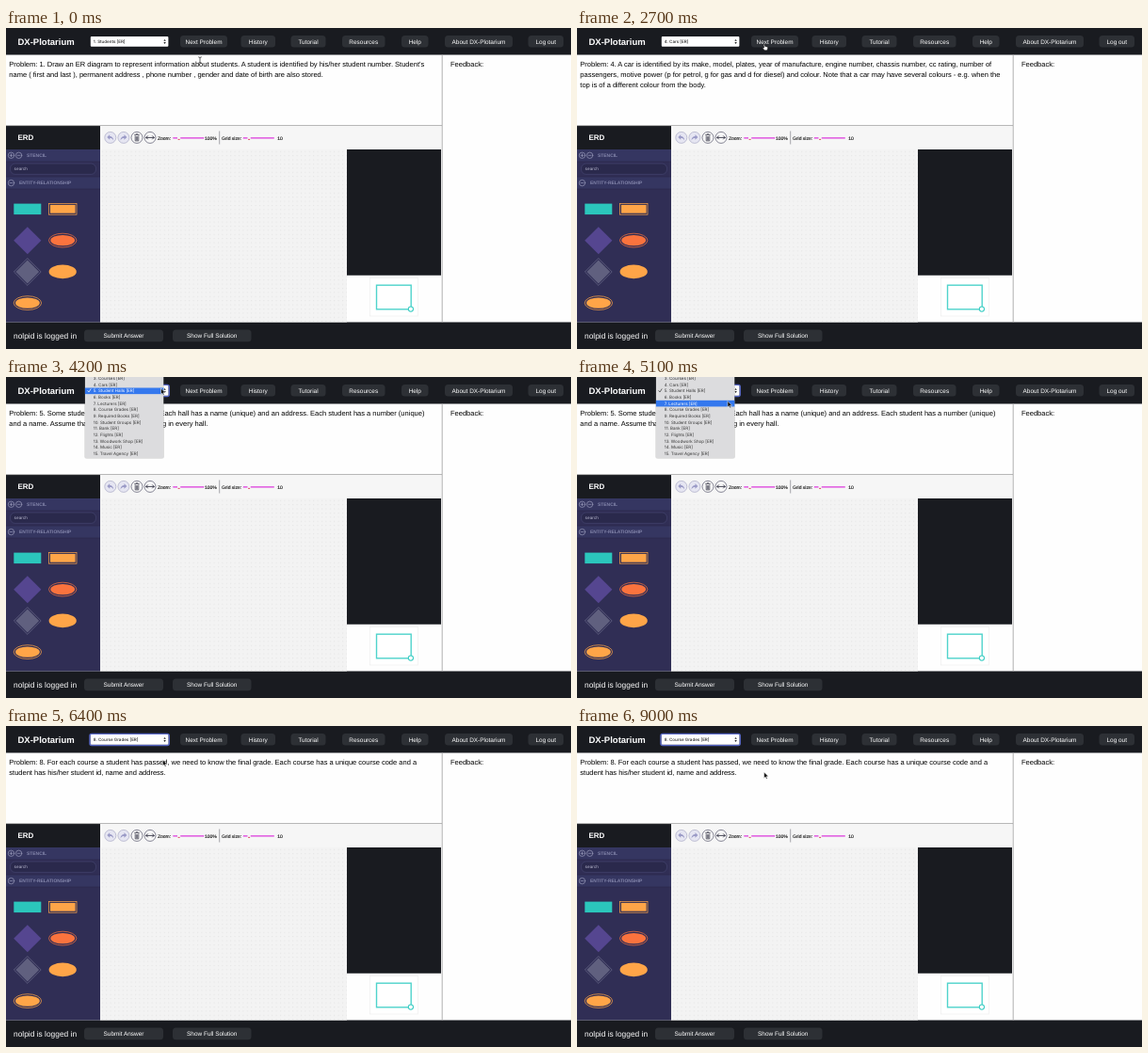
An HTML page for the animation above (9100 ms loop, 600 px wide and 341 px high).

```html
<!DOCTYPE html>
<html lang="en">
<head>
<meta charset="utf-8">
<title>ER diagram exercises</title>
<style>
  html, body { margin: 0; height: 100%; overflow: hidden; background: #fff; }
  svg { display: block; width: 100vw; height: 100vh; }
  text { font: 7.5px "Liberation Sans", Arial, sans-serif; text-rendering: geometricPrecision; white-space: pre; }
  .button rect { fill: #2d3035; }
  .button text { font-size: 6.45px; fill: #fff; text-anchor: middle; }
  .brand { font-size: 9.5px; font-weight: bold; fill: #fff; }
  .erd { font-size: 8px; font-weight: bold; fill: #fff; }
  .group { font-size: 4.95px; font-weight: bold; fill: #8587ac; }
  .tool { font-size: 5px; fill: #111; stroke: #111; stroke-width: .12; }
  .menu { font: 4.5px Inter, sans-serif; fill: #333; }
  .chosen { font-weight: 500; fill: #222; }
  .line { fill: none; stroke-linecap: round; stroke-linejoin: round; }
</style>
</head>
<body>
<svg viewBox="0 0 600 341" preserveAspectRatio="none">
  <defs>
    <pattern id="dots" x="100" y="129" width="4.4" height="4.4" patternUnits="userSpaceOnUse">
      <rect x="2" y="2" width=".8" height=".8" fill="#d8d8d8"/>
    </pattern>
  </defs>

  <!-- page panels -->
  <rect width="600" height="341" fill="#fefefe"/>
  <path d="M0 0H600V28.5H0zM0 312.5H600V341H0zM0 104H100V129H0zM362 129H462V262.5H362z" fill="#191b20"/>
  <path d="M0 103.6H463M463.2 28.5V312.5" stroke="#a6a6a8" stroke-width=".9"/>
  <rect x="100" y="104.2" width="362" height="25" fill="#f6f6f6"/>
  <rect x="100" y="129" width="262" height="183.5" fill="#f3f3f3"/>
  <rect x="100" y="129" width="262" height="183.5" fill="url(#dots)"/>
  <rect x="362" y="129" width="100" height="133.5" fill="#191b20"/>
  <text class="brand" x="12.5" y="17.8">DX-Plotarium</text>
  <text class="erd" x="12.5" y="119.4">ERD</text>
  <text x="472" y="41">Feedback:</text>
  <text x="8" y="329.5" style="font-size:8.4px" fill="#fff">nolpid is logged in</text>
  <g id="buttons"></g>

  <!-- toolbar -->
  <g stroke-width=".7">
    <g fill="#e6e6f2" stroke="#a9a9c4"><circle cx="110.8" cy="116.4" r="6"/><circle cx="124.9" cy="116.4" r="6"/></g>
    <g fill="#f8f8f8" stroke="#55556a"><circle cx="139" cy="116.4" r="6"/><circle cx="153" cy="116.4" r="6"/></g>
  </g>
  <path id="undo" d="M107.3 116L110.2 113.3V115C112.6 115 114 116.6 114.2 119.4C113.2 117.6 112 117 110.2 117V118.7z" fill="#9a9ac6"/>
  <use href="#undo" transform="matrix(-1 0 0 1 235.7 0)"/>
  <path d="M136.6 113.6H141.4M138.2 112.7H139.8M137.2 114.8V119.9H140.8V114.8M138.4 115.5V119M139.6 115.5V119" class="line" stroke="#333344" stroke-width=".7"/>
  <path d="M148.8 116.4H157.2M150.4 114.8L148.8 116.4L150.4 118M155.6 114.8L157.2 116.4L155.6 118" class="line" stroke="#333344" stroke-width=".9"/>
  <text class="tool" x="161" y="118.5">Zoom:</text>
  <text class="tool" x="211" y="118.5">100%</text>
  <text class="tool" x="229" y="118.5">Grid size:</text>
  <text class="tool" x="288.3" y="118.5">10</text>
  <path d="M226.7 109.5V123.5" stroke="#85858c" stroke-width=".7"/>
  <g id="slider">
    <path d="M177.3 116.9H182M185.2 116.9H210.3" stroke="#dc38dc" stroke-width="1.3"/>
    <path d="M182.6 118.4H184.6" stroke="#e0556d" stroke-width="1.1"/>
  </g>
  <use href="#slider" x="74.5"/>

  <!-- stencil -->
  <rect y="129" width="100" height="183.5" fill="#302e55"/>
  <path d="M0 129H100V142H0zM0 158H100V171H0z" fill="#353661"/>
  <path d="M0 142H100M0 158H100M0 171H100" stroke="#292849" stroke-width=".6"/>
  <g class="line" stroke="#9a9bbb" stroke-width=".7">
    <circle cx="5.5" cy="135.3" r="3.2"/><circle cx="13.6" cy="135.3" r="3.2"/><circle cx="5.5" cy="164.6" r="3.2"/>
    <path d="M4 135.3H7M5.5 133.8V136.8M12.1 135.3H15.1M4 164.6H7"/>
  </g>
  <text class="group" x="22" y="137.2">STENCIL</text>
  <text class="group" x="14" y="166.4">ENTITY-RELATIONSHIP</text>
  <rect x="4.5" y="144" width="91" height="11.4" rx="5.2" fill="#2a294c" stroke="#484874" stroke-width=".6"/>
  <text class="menu" x="8.6" y="151.2" style="fill:#b9b9cf">search</text>
  <rect x="8.3" y="186.6" width="29" height="11.5" fill="#2bc6bc"/>
  <g fill="#ffa548">
    <rect x="47" y="187.9" width="26.6" height="8.8"/>
    <ellipse cx="60.2" cy="258.9" rx="14.6" ry="7.3"/>
    <ellipse cx="22.9" cy="292.1" rx="12.9" ry="5.7"/>
  </g>
  <g fill="none" stroke="#ffa548" stroke-width=".7">
    <rect x="45.6" y="186.4" width="29.4" height="11.8"/>
    <ellipse cx="22.9" cy="292.1" rx="14.7" ry="7.4"/>
  </g>
  <path d="M22.8 211.2L37.4 225.7L22.8 240.2L8.2 225.7z" fill="#554690"/>
  <ellipse cx="60.2" cy="225.6" rx="12.9" ry="5.7" fill="#fa733e"/>
  <ellipse cx="60.2" cy="225.6" rx="14.7" ry="7.4" fill="none" stroke="#fa733e" stroke-width=".7"/>
  <path d="M22.8 246.6L35.2 259L22.8 271.4L10.4 259z" fill="#60607f"/>
  <path d="M22.8 244.6L37.2 259L22.8 273.4L8.4 259z" fill="none" stroke="#6c6c8b" stroke-width=".7"/>

  <!-- navigator -->
  <rect x="386.5" y="265.5" width="51" height="40.5" fill="#fff" stroke="#eee" stroke-width=".7"/>
  <rect x="393.5" y="273.2" width="36.7" height="25.6" fill="none" stroke="#4fd3cb" stroke-width="1.4"/>
  <circle cx="429.9" cy="298.6" r="2.6" fill="#fff" stroke="#3ccdc4" stroke-width="1.1"/>

  <g id="problem"></g>

  <!-- exercise chooser -->
  <rect id="focus" x="89" y="8.4" width="84.2" height="12" rx="2" fill="none" stroke="#5868c8" stroke-width="1.5"/>
  <rect x="89.8" y="9.1" width="82.6" height="10.6" rx="1" fill="#fff"/>
  <path d="M167.4 13.7L168.6 11.9L169.8 13.7zM167.4 15.1L168.6 16.9L169.8 15.1z" fill="#222"/>
  <g id="popup">
    <rect x="83.3" y="-5" width="84.6" height="91.8" rx="2.5" fill="#000" opacity=".14"/>
    <rect x="83.9" y="-5" width="83.4" height="91" rx="2" fill="#dcdcde"/>
    <rect id="mark" x="83.9" width="83.4" height="6.65" fill="#3478ee"/>
    <g id="items"></g>
    <path id="check" d="M86.8 14.6L88 16L90 12.8" class="line" stroke-width=".7"/>
  </g>
  <text id="chosen" class="menu chosen" x="92.8" y="16.1"></text>

  <!-- pointers -->
  <g id="arrow">
    <path d="M0 0V6.4L1.5 5.1L2.5 7.3L3.6 6.8L2.6 4.7L4.6 4.6z" fill="#111" stroke="#fff" stroke-width=".5"/>
  </g>
  <g id="hand">
    <path d="M1 .5Q1.8 -.2 2.2 .6L2.7 2.4L5 2.9Q5.9 3.2 5.7 4.3L5 6.8H2.2L.2 4.5Q.1 3.6 1.6 4z" fill="#fff" stroke="#111" stroke-width=".6"/>
  </g>
  <path id="beam" d="M-1.4 -3.2Q0 -3.2 0 -2.4Q0 -3.2 1.4 -3.2M0 -2.4V2.4M-1.4 3.2Q0 3.2 0 2.4Q0 3.2 1.4 3.2" class="line" stroke="#222" stroke-width=".7"/>
</svg>
<script>
const LOOP = 9100, STEP = 100, ROW = 6.65;
const $ = id => document.getElementById(id);

const buttons = [
  ["Next Problem", 185, 235], ["History", 249.5, 286], ["Tutorial", 302.5, 339.5], ["Resources", 357, 402.5],
  ["Help", 420, 448.5], ["About DX-Plotarium", 466, 538], ["Log out", 554.5, 592],
  ["Submit Answer", 83, 167, 320.6], ["Show Full Solution", 177, 260.5, 320.6]
];
$("buttons").innerHTML = buttons.map(([label, x1, x2, y = 8]) =>
  `<g class="button"><rect x="${x1}" y="${y}" width="${x2 - x1}" height="12.6" rx="3.5"/>
   <text x="${(x1 + x2) / 2}" y="${y + 8.7}">${label}</text></g>`).join("");

const titles = ["Students", "Airplanes", "Courses", "Cars", "Student Halls", "Books", "Lecturers", "Course Grades",
  "Required Books", "Student Groups", "Bank", "Flights", "Woodwork Shop", "Music", "Travel Agency"]
  .map((title, i) => `${i + 1}. ${title} [ER]`);
const FIRST = 2; // first menu row on screen
$("items").innerHTML = titles.slice(FIRST).map((title, i) =>
  `<text class="menu" x="92.8" y="${3.1 + i * ROW}">${title}</text>`).join("");
const items = [...$("items").children];

const problems = {
  1: ["Draw an ER diagram to represent information about students. A student is identified by his/her student number. Student's",
    "name ( first and last ), permanent address , phone number , gender and date of birth are also stored."],
  2: ["An airplane has a registration number, type, number of economy class seats, number of business class seats and the year of",
    "production."],
  3: ["A course is identified by its course code. The title of the course, the number of points and the year in which it was",
    "first offered are also stored."],
  4: ["A car is identified by its make, model, plates, year of manufacture, engine number, chassis number, cc rating, number of",
    "passengers, motive power (p for petrol, g for gas and d for diesel) and colour. Note that a car may have several colours - e.g. when the",
    "top is of a different colour from the body."],
  5: ["Some students live in student halls. Each hall has a name (unique) and an address. Each student has a number (unique)",
    "and a name. Assume that there are students living in every hall."],
  8: ["For each course a student has passed, we need to know the final grade. Each course has a unique course code and a",
    "student has his/her student id, name and address."]
};

// [start time, exercise number]
const shown = [[0, 1], [900, 2], [1900, 3], [2400, 4], [3200, 5], [6200, 8]];
const picked = [...shown.slice(0, -1), [6000, 8]];
// [time, x, y] of the pointer tip
const path = [[0, 206, 34], [200, 206, 34], [700, 197, 17], [3300, 197, 17], [3900, 164.5, 12], [4500, 164.5, 12],
  [5500, 157.5, 33], [6100, 157.5, 33], [7000, 192, 44], [7800, 192, 44], [8600, 198.6, 49], [LOOP, 198.6, 49]];

const latest = (list, t) => list.filter(([start]) => start <= t).pop()[1];
const show = (id, on) => $(id).style.display = on ? "" : "none";

function pointer(t) {
  const i = path.findIndex(([time]) => time > t);
  const [t0, x0, y0] = path[i - 1], [t1, x1, y1] = path[i];
  const u = (t - t0) / (t1 - t0), k = u * u * (3 - 2 * u);
  return [x0 + (x1 - x0) * k, y0 + (y1 - y0) * k];
}

let current;
function draw(t) {
  const number = latest(shown, t);
  if (number !== current) {
    current = number;
    $("problem").innerHTML = problems[number].map((line, i) =>
      `<text x="3.3" y="${40.8 + i * 11.3}">${i ? "" : `Problem: ${number}. `}${line}</text>`).join("");
  }
  $("chosen").textContent = titles[latest(picked, t) - 1];

  const [x, y] = pointer(t);
  const open = t >= 4100 && t < 6000, fading = open && t >= 5900;
  show("popup", open);
  show("focus", t >= 4100);
  show("chosen", !open || fading);
  $("popup").setAttribute("opacity", fading ? .7 : 1);
  const row = Math.floor((y + 1.8) / ROW);
  $("mark").setAttribute("y", row * ROW - 1.8);
  items.forEach((item, i) => item.style.fill = i === row ? "#fff" : "");
  $("check").setAttribute("stroke", row === 2 ? "#fff" : "#333");

  const kind = t < 400 ? "beam" : t >= 600 && t < 3500 ? "hand" : "arrow";
  for (const id of ["beam", "hand", "arrow"]) show(id, id === kind);
  $(kind).setAttribute("transform", `translate(${x} ${y})`);
}

const start = performance.now();
function tick() {
  const t = Math.max(0, performance.now() - start) % LOOP;
  draw(Math.floor(t / STEP) * STEP);
  requestAnimationFrame(tick);
}
tick();
</script>
</body>
</html>
```
